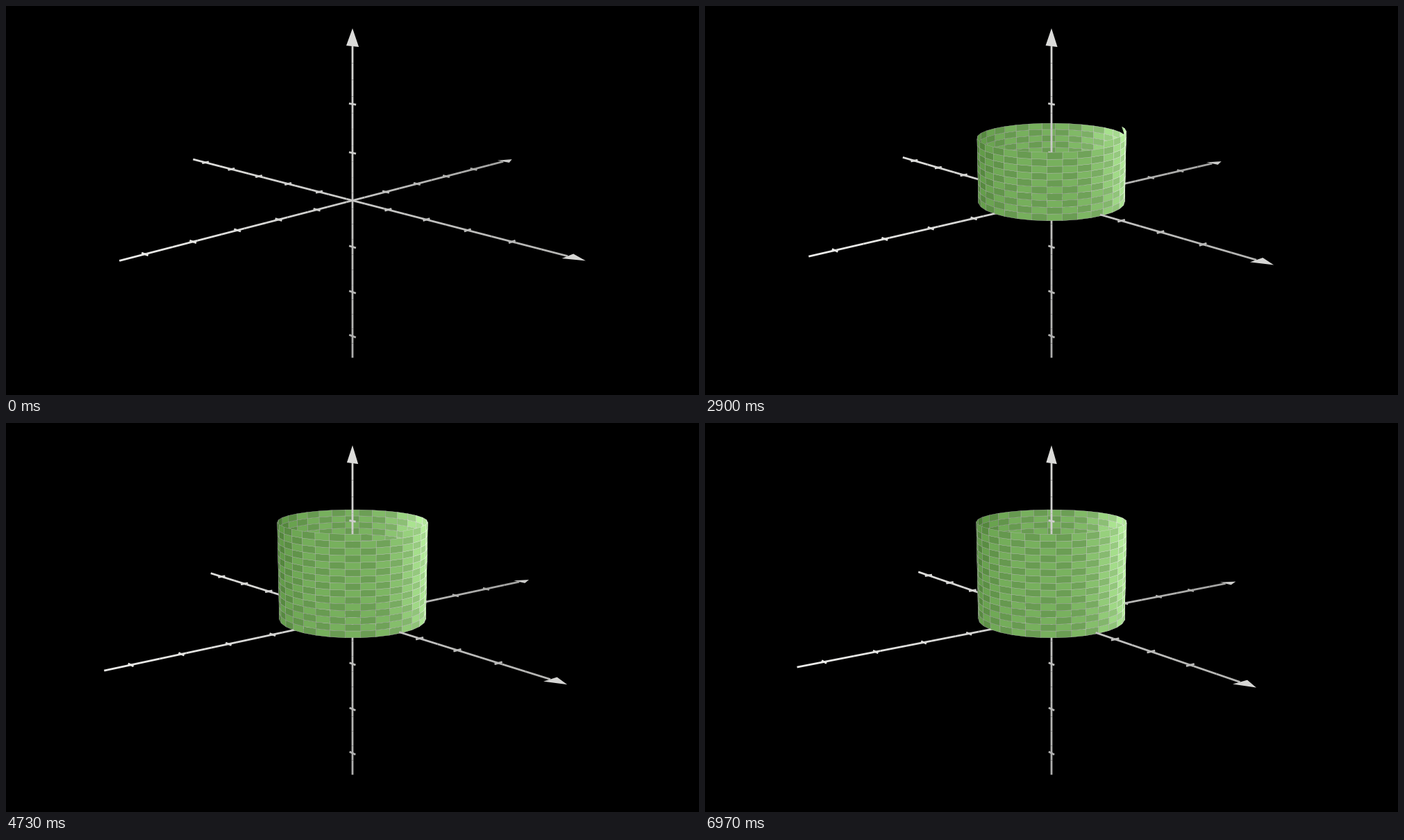
A matplotlib script for the animation above (7010 ms loop, 998 px wide and 561 px high).

```python
import numpy as np
import matplotlib.pyplot as plt
from matplotlib.animation import FuncAnimation
from matplotlib.collections import PolyCollection

W, H, DPI = 998, 561, 64
FRAMES, LOOP_MS, FPS = 210, 7010, 30
PX = 72 / DPI                      # one pixel in points
UNIT = H / 8                       # pixels per scene unit
FOCAL = 20
PHI = np.radians(75)
SPIN = 0.02                        # camera rotation, rad/s
DRAW_TIME = 5                      # seconds to build the surface
ROWS, COLS = 15, 32
RADIUS, HEIGHT = 1.5, 2.0
LIGHT = np.array([-7.0, -9.0, 10.0])
TIP = 0.35


def project(pts, angle):
    """Return pixel positions and depth of scene points."""
    x, y, z = np.moveaxis(pts, -1, 0)
    c, s = np.cos(angle), np.sin(angle)
    right, back = c * x + s * y, c * y - s * x
    up = back * np.cos(PHI) + z * np.sin(PHI)
    depth = z * np.cos(PHI) - back * np.sin(PHI)
    k = UNIT * FOCAL / (FOCAL - depth)
    return np.stack([W / 2 + right * k, H / 2 - up * k], -1), depth


def smooth(t):
    sig = lambda v: 1 / (1 + np.exp(-v))
    low = sig(-5)
    return np.clip((sig(10 * (t - 0.5)) - low) / (1 - 2 * low), 0, 1)


def grey(v):
    return (v, v, v * 0.99, 1)


CLEAR = (0, 0, 0, 0)
shapes, fills, edges, widths = [], [], [], []


def add(pts, fill, edge, width):
    shapes.append(np.array(pts, float))
    fills.append(fill)
    edges.append(edge)
    widths.append(width * PX)


def add_axis(d, side, half, first, last, dim, bright, tip_tone):
    """Axis along d, with ticks and arrowhead lying along side."""
    d, side = np.array(d, float), np.array(side, float)
    base = half - TIP
    tone = lambda p: grey(dim + (bright - dim) * (p + half) / (2 * half))
    cuts = np.linspace(-half, base, 21)
    for p, q in zip(cuts[:-1], cuts[1:]):
        add([d * p, d * q], CLEAR, tone((p + q) / 2), 2.8)
    for n in range(first, last + 1):
        if n:
            add([d * n - side * 0.1, d * n + side * 0.1], CLEAR, tone(n), 2.8)
    wing = side * TIP / 2
    add([d * half, d * base + wing, d * base - wing, d * half],
        grey(tip_tone), CLEAR, 0)


X, Y, Z = np.eye(3)
add_axis(X, Y, 5.5, -5, 4, 0.87, 0.70, 0.84)
add_axis(Y, X, 5.5, -5, 4, 0.93, 0.62, 0.80)
add_axis(Z, X, 3.5, -3, 2, 0.68, 0.85, 0.86)
n_axis = len(shapes)


def on_wall(v, z):
    return np.array([RADIUS * np.cos(v), RADIUS * np.sin(v), z])


def shade(rgb, point, normal):
    sun = LIGHT - point
    f = 0.5 * (normal @ sun / np.linalg.norm(sun)) ** 3
    f = f / 2 if f < 0 else f
    return (*np.clip(np.array(rgb) / 255 + f, 0, 1), 1)


GREENS = [(119, 176, 93), (105, 156, 82)]
LINE = (187, 187, 187)
dv, dz = 2 * np.pi / COLS, HEIGHT / ROWS
for i in range(ROWS):
    for j in range(COLS):
        v0, v1, z0, z1 = j * dv, (j + 1) * dv, i * dz, (i + 1) * dz
        vm = (v0 + v1) / 2
        mid = on_wall(vm, (z0 + z1) / 2)
        inward = -np.array([np.cos(vm), np.sin(vm), 0])
        add([on_wall(v0, z0), on_wall(v0, z1), on_wall(v1, z1),
             on_wall(v1, z0), on_wall(v0, z0)],
            shade(GREENS[(i + j) % 2], mid, inward),
            shade(LINE, mid, inward), 0.36)

fills, edges, widths = map(np.array, (fills, edges, widths))


def part_of(path, frac):
    """The first part of a path, by share of its segments."""
    pos = frac * (len(path) - 1)
    k = int(pos)
    end = path[k] + (path[k + 1] - path[k]) * (pos - k)
    return np.vstack([path[:k + 1], end])


fig = plt.figure(figsize=(W / DPI, H / DPI), dpi=DPI, facecolor="black")
ax = fig.add_axes([0, 0, 1, 1])
ax.set_xlim(0, W)
ax.set_ylim(H, 0)
ax.axis("off")
scene = PolyCollection([], closed=False, capstyle="butt", joinstyle="miter")
scene.set_snap(False)
ax.add_collection(scene, autolim=False)


def update(frame):
    t = frame / FPS
    angle = np.pi / 4 + SPIN * t
    cells = ROWS * COLS * smooth(t / DRAW_TIME) if t < DRAW_TIME else ROWS * COLS
    full = int(cells)
    visible = shapes[:n_axis + full]
    if cells - full > 0.01:
        visible = visible + [part_of(shapes[n_axis + full], cells - full)]

    # Project every point at once, then split back into shapes.
    sizes = [len(s) for s in visible]
    stops = np.cumsum(sizes)
    xy, _ = project(np.vstack(visible), angle)
    paths = np.split(xy, stops[:-1])
    centers = np.array([(s.min(0) + s.max(0)) / 2 for s in visible])
    order = np.argsort(project(centers, angle)[1], kind="stable")

    scene.set_verts([paths[k] for k in order], closed=False)
    scene.set_facecolor(fills[order])
    scene.set_edgecolor(edges[order])
    scene.set_linewidth(widths[order])
    return [scene]


anim = FuncAnimation(fig, update, frames=FRAMES, interval=LOOP_MS / FRAMES,
                     repeat=True, repeat_delay=0, blit=False)
plt.show()
```
